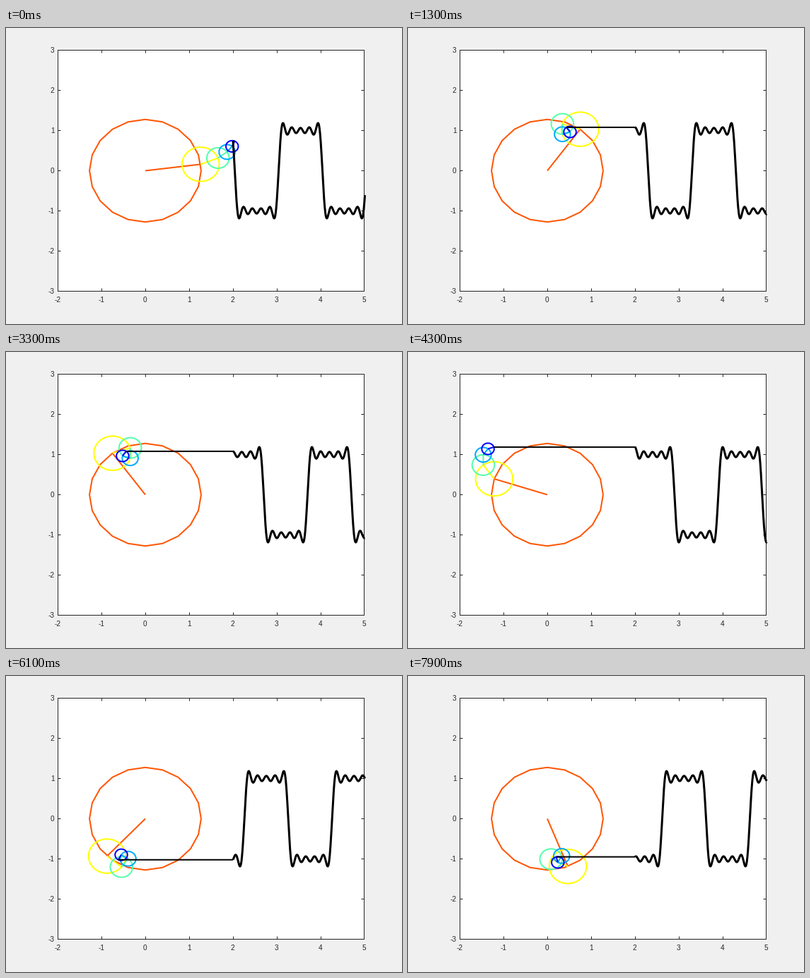
These frames come from a looping animation (560 px wide and 420 px high, 8000 ms). A matplotlib script:

```python
import numpy as np
import matplotlib.pyplot as plt
from matplotlib.animation import FuncAnimation
from matplotlib.transforms import Bbox, TransformedBbox

W, H = 560, 420
FRAMES, INTERVAL = 80, 100
PX = 0.72  # points per pixel at 100 dpi
STEP = 2 * np.pi / 100
INK = "#262626"

HARMONICS = [
    (1, (1, 1 / 3, 0)),
    (3, (1, 1, 0)),
    (5, (1 / 3, 1, 2 / 3)),
    (7, (0, 2 / 3, 1)),
    (9, (0, 0, 1)),
]

plt.rcParams.update({
    "font.family": "Liberation Sans",
    "axes.unicode_minus": False,
})


def radius(k):
    return 4 / (np.pi * k)


def square(t):
    return sum(radius(k) * np.sin(k * t) for k, _ in HARMONICS)


fig = plt.figure(figsize=(W / 100, H / 100), dpi=100, facecolor="#f0f0f0")


def add_axes(left, right, top, bottom):
    """Axes placed by pixel edges, counted from the top left corner."""
    axes = fig.add_axes([left / W, 1 - bottom / H,
                         (right - left) / W, (bottom - top) / H])
    axes.set(xlim=(-2, 5), ylim=(-3, 3))
    return axes


# The frame lines lie just inside the plot area, so they get their own axes.
frame = add_axes(72.9, 506.45, 30.6, 372.8)
frame.set(xticks=range(-2, 6), yticks=range(-3, 4))
frame.tick_params(direction="in", top=True, right=True, length=4.3 * PX,
                  width=PX, color=INK, labelcolor=INK, labelsize=10 * PX)
frame.tick_params(axis="x", pad=8 * PX)
frame.tick_params(axis="y", pad=4.5 * PX)
for spine in frame.spines.values():
    spine.set(linewidth=PX, color=INK)

ax = add_axes(73, 507, 31, 374)
ax.axis("off")

# Strokes may overlap the frame line by a pixel or two.
clip = TransformedBbox(Bbox([[72 / W, 45 / H], [509 / W, 390 / H]]),
                       fig.transFigure)


def stroke(color, width):
    line, = ax.plot([], [], color=color, lw=width * PX, snap=False,
                    solid_capstyle="butt", solid_joinstyle="round")
    line.set_clip_box(clip)
    return line


circles = []
for k, color in HARMONICS:
    a = np.linspace(0, 2 * np.pi, 20 * k + 1)
    ring = radius(k) * np.cos(a), radius(k) * np.sin(a)
    circles.append((k, ring, stroke(color, 2), stroke(color, 2)))
link = stroke("k", 2)
wave = stroke("k", 3)
wave_x = np.linspace(2, 5.008, 602)


def update(i):
    t = (i + 2) * STEP
    x = y = 0.0
    for k, (rx, ry), rim, arm in circles:
        nx = x + radius(k) * np.cos(k * t)
        ny = y + radius(k) * np.sin(k * t)
        rim.set_data(x + rx, y + ry)
        arm.set_data([x, nx], [y, ny])
        x, y = nx, ny
    link.set_data([x, 2], [y, y])
    wave.set_data(wave_x, square(t - np.pi * (wave_x - 2)))
    return []


anim = FuncAnimation(fig, update, frames=FRAMES, interval=INTERVAL,
                     repeat=True, repeat_delay=0, blit=False)
plt.show()
```
